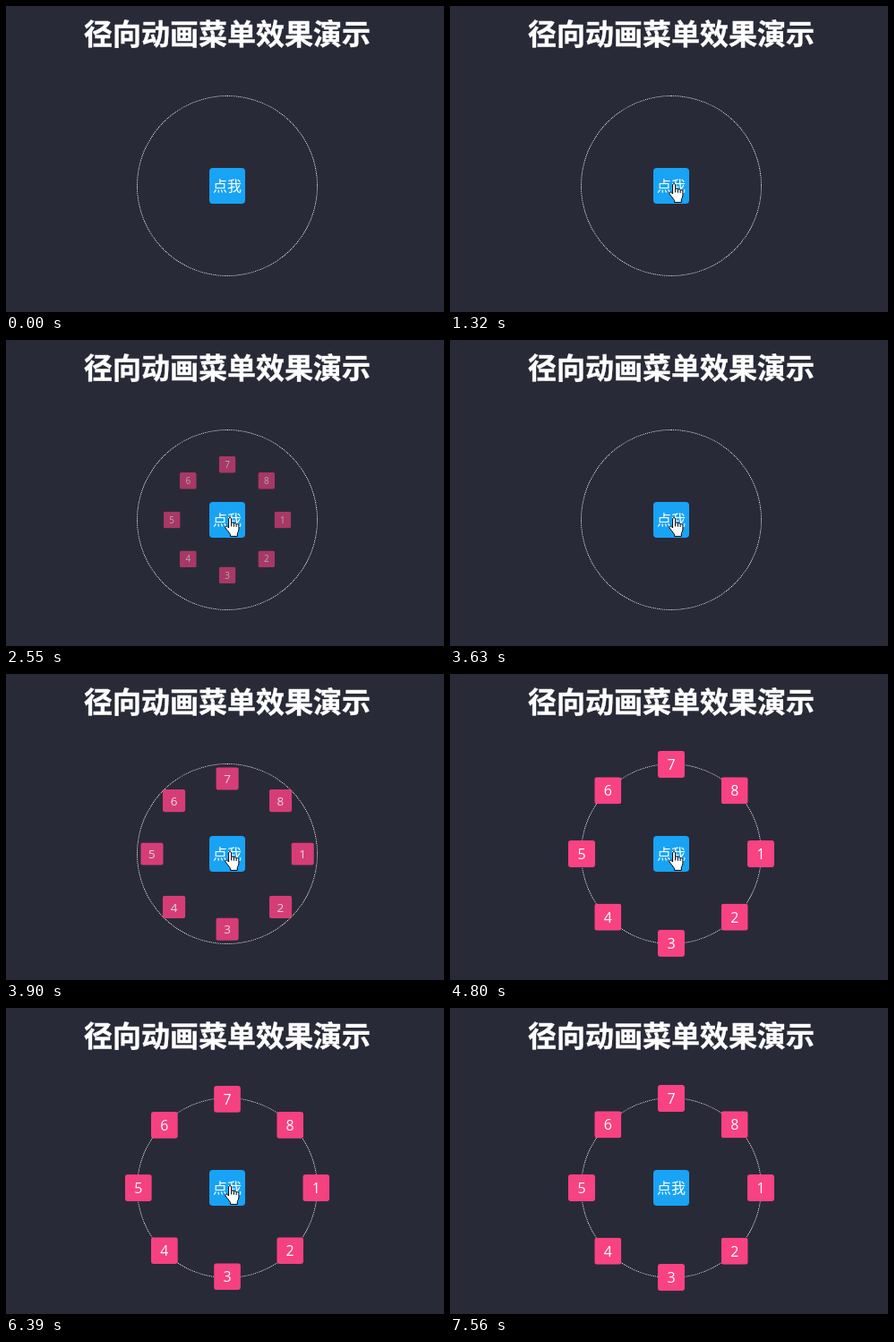
Write an HTML page that moves like this. It is 489 px wide and 342 px high and loops after 8.1 s.

```html
<!DOCTYPE html>
<html lang="zh-CN">
<head>
<meta charset="utf-8">
<title>径向动画菜单效果演示</title>
<style>
  :root { --loop: 8100ms; }
  html, body {
    margin: 0;
    width: 100%;
    height: 100%;
    overflow: hidden;
    background: #292a38;
  }
  body {
    position: relative;
    color: #fff;
    font: 16px "Noto Sans CJK SC", "Noto Sans CJK", sans-serif;
    text-align: center;
  }
  h1, .ring, .item, .button, .cursor { position: absolute; }
  h1 {
    left: 47px;
    top: 9px;
    width: 400px;
    margin: 0;
    font-size: 32px;
    font-weight: 700;
    line-height: 40px;
    white-space: nowrap;
    -webkit-text-stroke: .4px #fff;
  }
  .ring {
    left: 146px;
    top: 100px;
    width: 200px;
    height: 200px;
    border: 1px dotted #fff;
    border-radius: 50%;
  }
  .item {
    left: 232px;
    top: 186px;
    width: 30px;
    height: 30px;
    border-radius: 3px;
    background: #f84282;
    font-family: "Open Sans", "Noto Sans", sans-serif;
    line-height: 30px;
    --a: calc(var(--i) * 45deg);
    animation: menu var(--loop) ease infinite;
  }
  .button {
    left: 227px;
    top: 181px;
    width: 40px;
    height: 40px;
    border-radius: 4px;
    background: #18a3f5;
    line-height: 38px;
    white-space: nowrap;
  }
  .cursor {
    left: 0;
    top: 0;
    width: 1px;
    height: 1px;
    overflow: visible;
    fill: #fff;
    stroke: #000;
    stroke-linejoin: round;
    animation: travel var(--loop) linear infinite;
  }
  .arrow { animation: arrow var(--loop) step-end infinite; }
  .hand { animation: hand var(--loop) step-end infinite; }

  @keyframes menu {
    0%, 16.049%, 36.198%, 44.815%, 65.617%, 73.457% {
      opacity: 0;
      transform: rotate(var(--a)) translateX(0) rotate(calc(-1 * var(--a))) scale(0);
    }
    22.222%, 30.025%, 50.988%, 59.444%, 79.63%, 100% {
      opacity: 1;
      transform: rotate(var(--a)) translateX(100px) rotate(calc(-1 * var(--a))) scale(1);
    }
  }
  @keyframes travel {
    0%, 2.593% {
      transform: translate(482px, 30px);
      animation-timing-function: ease-out;
    }
    10% { transform: translate(250px, 198px); }
    87.778% {
      transform: translate(250px, 198px);
      animation-timing-function: ease-in;
    }
    93.333%, 100% { transform: translate(489px, 52px); }
  }
  @keyframes arrow {
    0%, 8.37%, 93.333%, 100% { visibility: hidden; }
    2.593%, 89.012% { visibility: visible; }
  }
  @keyframes hand {
    0%, 89.012%, 100% { visibility: hidden; }
    8.37% { visibility: visible; }
  }
</style>
</head>
<body>
  <h1>径向动画菜单效果演示</h1>
  <div class="ring"></div>
  <div class="item" style="--i:0">1</div>
  <div class="item" style="--i:1">2</div>
  <div class="item" style="--i:2">3</div>
  <div class="item" style="--i:3">4</div>
  <div class="item" style="--i:4">5</div>
  <div class="item" style="--i:5">6</div>
  <div class="item" style="--i:6">7</div>
  <div class="item" style="--i:7">8</div>
  <div class="button">点我</div>
  <svg class="cursor">
    <path class="arrow" d="M.5 .5V16.5L4.2 13L6.6 18.4L9 17.4L6.7 12.1H11.7Z"/>
    <g class="hand" transform="translate(-6 0)">
      <path d="M4.6 1.8C4.6 .2 7.6 .2 7.6 1.8V6.4C8.2 5.7 10.2 5.9 10.4 7.1C11 6.4 12.9 6.7 13.1 7.9C13.8 7.3 15.9 7.7 15.9 9.3V13.5C15.9 16 14.4 17 14.3 18.5V21.4H6.6V19.5C5.5 17.5 2.8 14.5 .9 11.9C.2 10.3 2 9.4 3.2 10.5L4.6 12Z"/>
      <path fill="none" d="M7.6 6.4V10.4M10.4 7.1V10.7M13.1 7.9V11"/>
    </g>
  </svg>
</body>
</html>
```
